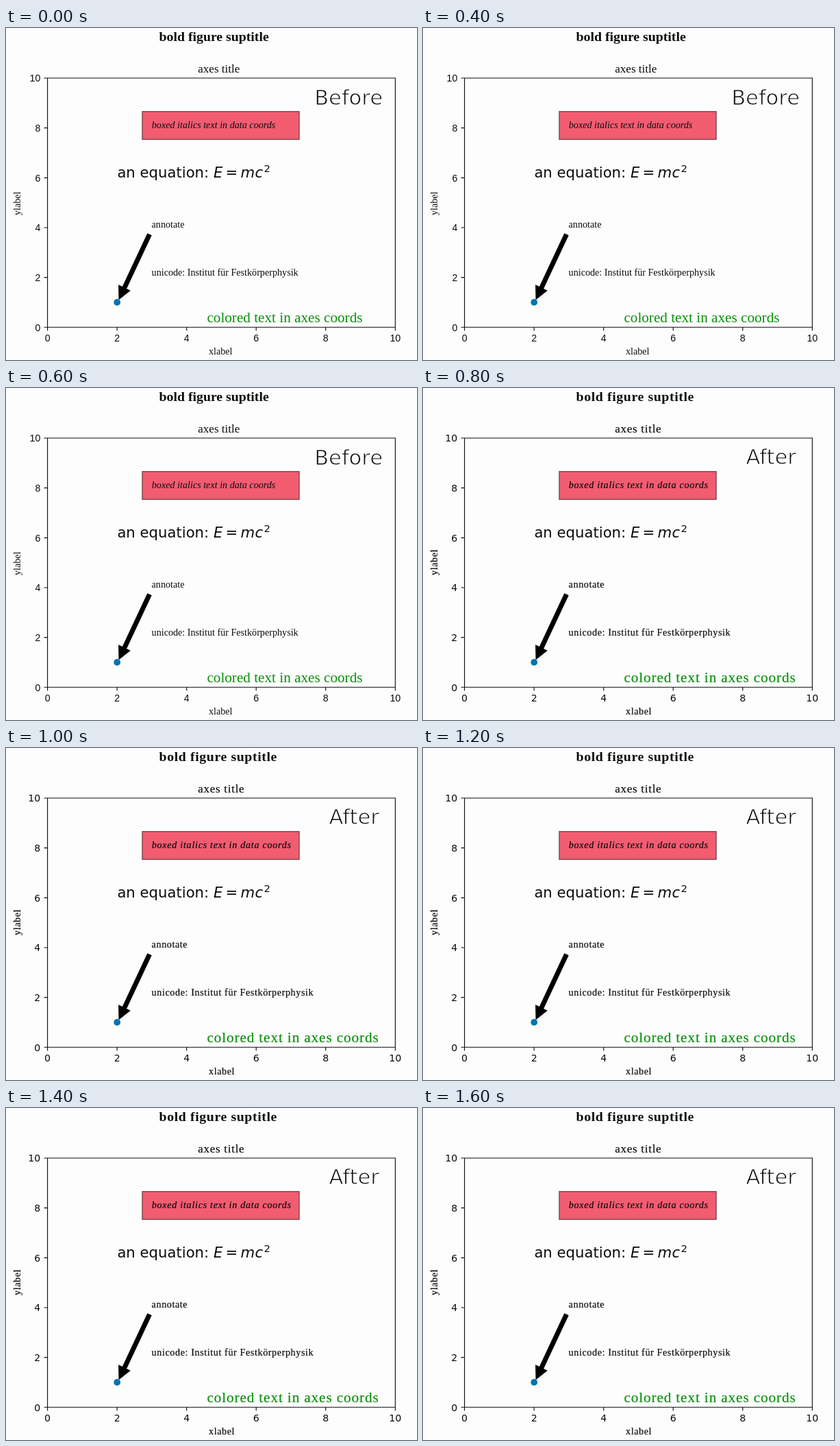
An HTML page that plays this animation: 600x484 px, repeating every 1800 ms.

```html
<!DOCTYPE html>
<html lang="en">
<head>
<meta charset="utf-8">
<title>Text styles, before and after</title>
<style>
  html, body { margin: 0; width: 100%; height: 100%; overflow: hidden; background: #fdfdfe; }
  svg { display: block; width: 100vw; height: 100vh; }
  text { fill: #0c0c0c; white-space: pre; }
  .serif { font-family: "Liberation Serif", serif; }
  .after .serif { letter-spacing: .042em; stroke: #0c0c0c; stroke-width: .2; }
  .after .bold { letter-spacing: .031em; stroke: none; }
  .after .italic { letter-spacing: .05em; }
  .bold { font-weight: 700; }
  .italic { font-style: italic; }
  .serif.green { fill: #0a8f0a; stroke: #0a8f0a; }
  .before .green { stroke: none; }
  .tick { font: 14.15px "Liberation Sans", sans-serif; }
  .after .tick { font-family: "DejaVu Sans", sans-serif; }
  .math { font-family: "DejaVu Sans", sans-serif; }
  .stamp { font: 400 30.5px "DejaVu Sans", sans-serif; stroke: #fdfdfe; stroke-width: 1; }
</style>
</head>
<body>
<svg id="stage" viewBox="0 0 600 484"></svg>
<script>
const NS = "http://www.w3.org/2000/svg";
const LOOP = 1800, SWITCH = 800;
const LEFT = 60.6, RIGHT = 568.3, TOP = 73, BOTTOM = 436.3;
const INK = "#0c0c0c";
const stage = document.getElementById("stage");

function add(tag, attrs, content = "") {
  const node = document.createElementNS(NS, tag);
  for (const key in attrs) node.setAttribute(key, attrs[key]);
  node.textContent = content;
  stage.appendChild(node);
  return node;
}

function label(content, x, y, size, attrs = {}) {
  return add("text", { class: "serif", x, y, "font-size": size, ...attrs }, content);
}

function drawAxes() {
  let d = `M${LEFT} ${TOP}H${RIGHT}V${BOTTOM}H${LEFT}Z`;
  for (let v = 0; v <= 10; v += 2) {
    const x = LEFT + (RIGHT - LEFT) * v / 10;
    const y = BOTTOM - (BOTTOM - TOP) * v / 10;
    d += `M${x} ${BOTTOM}v5M${LEFT} ${y}h-5`;
    add("text", { class: "tick", x, y: 457.2, "text-anchor": "middle" }, v);
    add("text", { class: "tick", x: 50.3, y: y + 5.2, "text-anchor": "end" }, v);
  }
  add("path", { d, fill: "none", stroke: INK, "stroke-width": 1.13 });
}

function drawArrow(x0, y0, x1, y1) {
  const len = Math.hypot(x1 - x0, y1 - y0);
  const angle = Math.atan2(y1 - y0, x1 - x0) * 180 / Math.PI;
  const neck = len - 17.5, shaft = 2.8, head = 8.7;
  add("path", {
    d: `M0 ${-shaft}H${neck}V${-head}L${len} 0L${neck} ${head}V${shaft}H0Z`,
    transform: `translate(${x0} ${y0}) rotate(${angle})`,
    fill: "#000", stroke: "#000", "stroke-width": 1.4
  });
}

function drawEquation(y) {
  const part = (content, x, style = "normal") =>
    label(content, x, y, 21.2, { class: "math", "font-style": style });
  part("an equation:", 162.4);
  part("E", 303, "oblique");
  part("=", 320.6);
  part("m", 342.6, "oblique");
  part("c", 363.4, "oblique");
  label("2", 376.4, y - 8, 14.85, { class: "math" });
}

drawAxes();
add("rect", {
  x: 199, y: 121.8, width: 229, height: 40.6,
  fill: "#f25c71", stroke: "#7b444b", "stroke-width": 1.4
});
label("bold figure suptitle", 223.6, 19.3, 19.8, { class: "serif bold" });
label("axes title", 280.3, 64.6, 17);
label("xlabel", 296, 475.5, 14.15);
label("ylabel", 0, 0, 14.15, { transform: "translate(21 273) rotate(-90)" });
label("boxed italics text in data coords", 212.8, 145.8, 14.15, { class: "serif italic" });
drawEquation(217.7);
label("annotate", 212.6, 291, 14.15);
label("unicode: Institut für Festkörperphysik", 212.6, 361, 14.15);
label("colored text in axes coords", 293.4, 428.6, 21.2, { class: "serif green" });
drawArrow(209.2, 301.4, 165.2, 395);
add("circle", { cx: 162.2, cy: 399.9, r: 4.9, fill: "#0a73b2" });
const stamp = add("text", { class: "stamp" });

let shown;
function render(ms) {
  const state = ms % LOOP < SWITCH ? "before" : "after";
  if (state === shown) return;
  shown = state;
  const before = state === "before";
  stage.setAttribute("class", state);
  stamp.textContent = before ? "Before" : "After";
  stamp.setAttribute("x", before ? 450.2 : 471.5);
  stamp.setAttribute("y", before ? 112.4 : 111.3);
}

const start = performance.now();
function tick() {
  render(performance.now() - start);
  requestAnimationFrame(tick);
}
tick();
</script>
</body>
</html>
```
